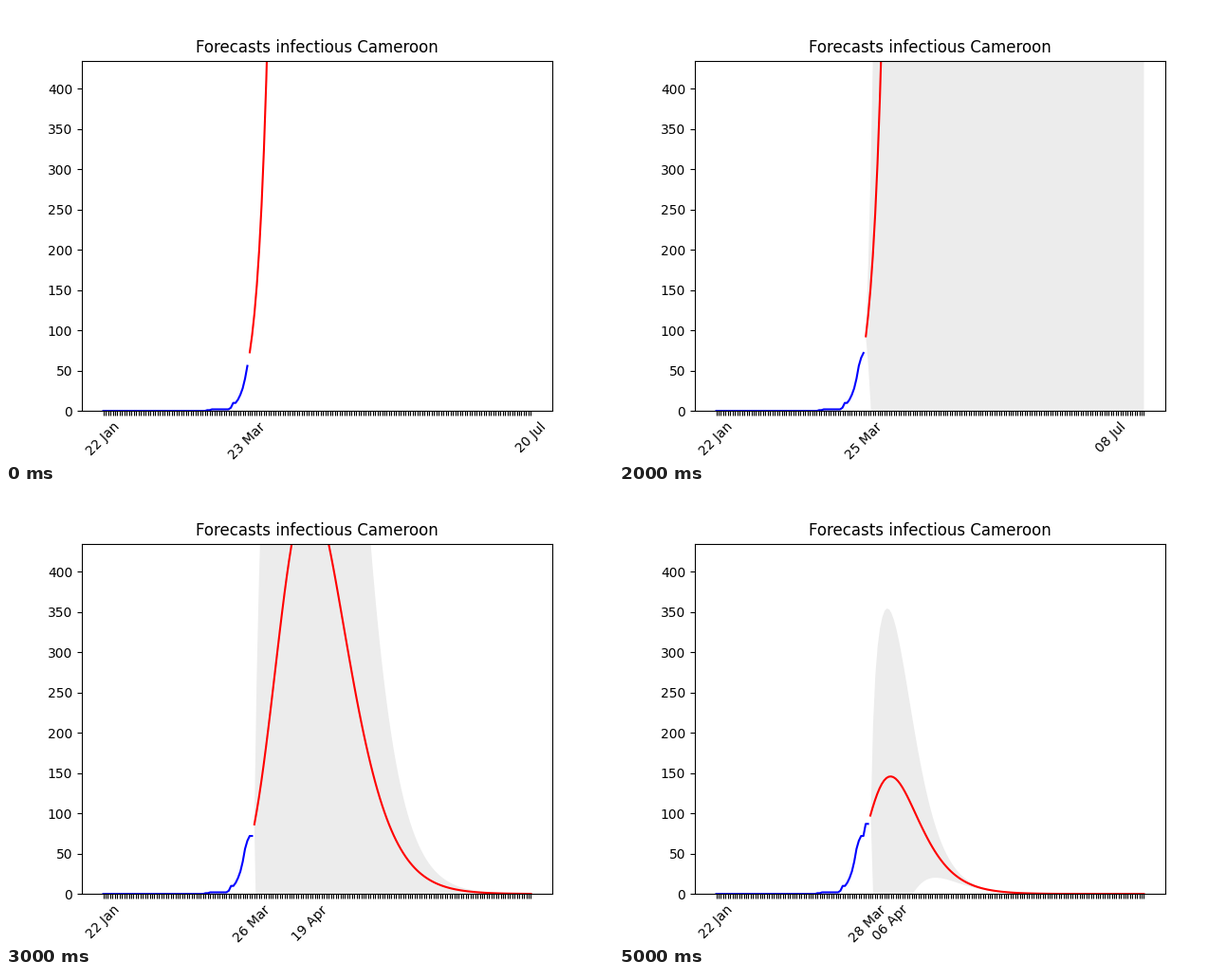
Recreate the animation shown at these times as a matplotlib script. Size 640 px wide and 480 px high, loop 6 s.

```python
import numpy as np
import matplotlib.pyplot as plt
from matplotlib.animation import FuncAnimation

MONTHS = [("Jan", 31), ("Feb", 29), ("Mar", 31), ("Apr", 30),
          ("May", 31), ("Jun", 30), ("Jul", 31)]
FIRST_DAY = 22
FIRST_KNOWN = 62
BAND_KNOWN = 64
HORIZON = 120
RECOVERY = 0.112
Y_MAX = 435

# starting growth rate and days until the peak, one pair per forecast
FITS = [(0.264, 120), (0.269, 120), (0.254, 106),
        (0.188, 24.6), (0.163, 16.55), (0.12, 9.8)]

# corners of the reported curve as (day, cases)
CORNERS = [(43, 0), (44, 1), (45, 1), (46, 2), (53, 2), (54, 4), (55, 10),
           (62, 66), (63, 72), (64, 72), (65, 87)]


def reported(days):
    cases = np.interp(days, *zip(*CORNERS))
    surge = np.round(10 * 1.41 ** (days - 56.0))
    return np.where((days > 55) & (days < 62), surge, cases)


def infectious(t, start, growth, peak):
    """Outbreak whose contact rate fades until growth is zero at the peak."""
    contact = growth + RECOVERY
    fade = np.log(contact / RECOVERY) / peak
    return start * np.exp(contact / fade * (1 - np.exp(-fade * t)) - RECOVERY * t)


def band_ratio(t, peak):
    """Half width of the band relative to the forecast."""
    size = min(0.93 + 0.072 * peak, 2.7)
    opening = 1 - np.exp(-t / max(1.1, peak / 22))
    closing = np.exp(-(t / (3.6 * peak - 7)) ** 1.6)
    return size * opening * closing


def day_label(index):
    day = FIRST_DAY + index
    for name, length in MONTHS:
        if day <= length:
            return f"{day:02d} {name}"
        day -= length


fig, ax = plt.subplots(figsize=(6.4, 4.8), dpi=100)


def draw(step):
    ax.clear()
    growth, peak = FITS[step]
    known = FIRST_KNOWN + step
    past = np.arange(known)
    cases = reported(past)
    t = np.arange(HORIZON)
    future = known + t
    forecast = infectious(t + 1, cases[-1], growth, peak)

    if known >= BAND_KNOWN:
        width = forecast * band_ratio(t, peak)
        ax.fill_between(future, forecast - width, forecast + width,
                        color="#ececec", linewidth=0)
    ax.plot(past, cases, color="blue")
    ax.plot(future, forecast, color="red")

    last = future[-1]
    top = future[forecast.argmax()]
    labels = [""] * (last + 1)
    labels[0] = day_label(0)
    labels[known - 1] = day_label(known - 1)
    labels[top] = day_label(top - 1)
    ax.set_xticks(range(last + 1), labels, rotation=45)
    ax.set_yticks(range(0, Y_MAX, 50))
    ax.set_xlim(-0.05 * last, 1.05 * last)
    ax.set_ylim(0, Y_MAX)
    ax.set_title("Forecasts infectious Cameroon")
    return []


anim = FuncAnimation(fig, draw, frames=len(FITS), init_func=lambda: draw(0),
                     interval=1000, repeat=True, repeat_delay=0)
plt.show()
```
